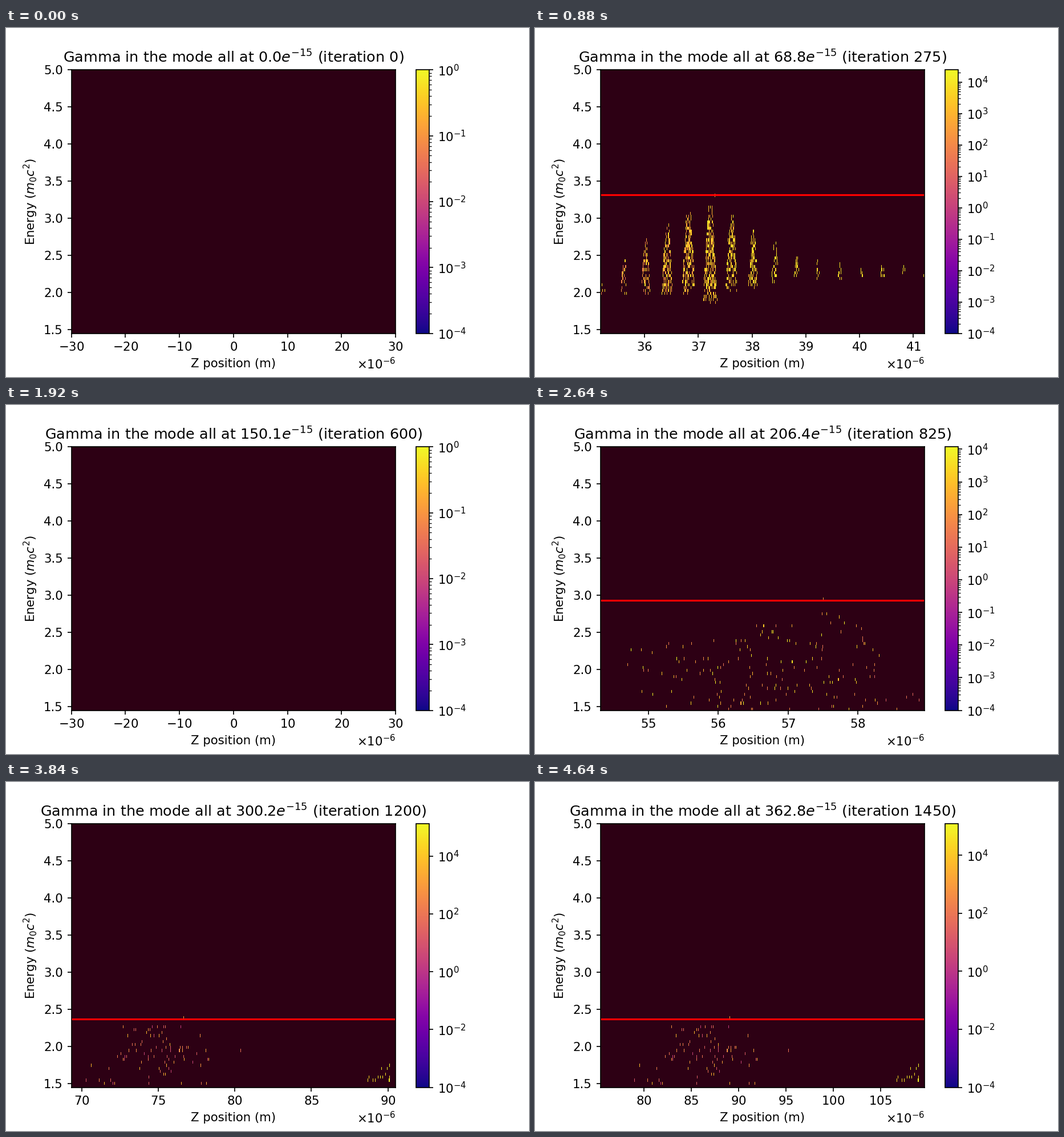
Recreate the animation shown at these times as a matplotlib script. Size 917 by 611 pixels, loop 4720 ms.

```python
import numpy as np
import matplotlib.pyplot as plt
from matplotlib.animation import FuncAnimation
from matplotlib.colors import LogNorm

plt.rcParams.update({"font.family": "DejaVu Sans", "font.size": 10})

FRAMES, INTERVAL = 59, 80
ITER_STEP, FS_PER_ITER = 25, 0.2502
COLS, ROWS = 568, 89
E_MIN, E_MAX, E_BIN = 1.45, 5.0, 0.04
E_TOP = E_MIN + ROWS * E_BIN
AXIS_PX = 568.5
UM = 1e-6
FIRST_DATA, BLANK = 3, 24
N_BUNCH, N_WIDE, N_TIGHT, N_LOW, N_FAST = 20, 170, 85, 9, 14

# Slow trends over the run, linear between these moments
KEYS = [3, 7, 15, 33, 48, 58]
LEFT = [31.0, 32.267, 38.088, 54.313, 69.333, 75.395]
RIGHT = [33.4, 36.307, 46.119, 58.955, 90.5, 109.67]
LOG_MAX = [3.9, 4.176, 4.594, 4.073, 5.113, 5.083]
E_LINE = [2.6, 3.31, 3.331, 2.93, 2.373, 2.373]
U_PEAK = [0.5, 0.506, 0.2, 0.685, 0.346, 0.398]


def at(k, values):
    return np.interp(k, KEYS, values)


def lerp(a, b, w):
    return a + (b - a) * w


def ramp(x, start, end):
    return np.clip((x - start) / (end - start), 0, 1)


def bell(x, center, width):
    return np.exp(-((x - center) / width) ** 2)


def early_bunches(i):
    """Count, lowest and highest energy, half width in px."""
    g = bell(i, 4.4, 2.4)
    root = np.sqrt(g)
    return np.array([330 * g, 2.0 + 0 * i, 2.04 + 1.24 * root, 4 + 13 * root])


def late_bunches(i):
    odd = i % 2
    core = bell(i, 5, 1.9)
    tail = 30 * (1 - i / 30) * ramp(i, 0, 3)
    count = (220 * core + tail) * (0.75 + 0.5 * odd)
    low = lerp(1.95, 2.4, ramp(i, 5, 9)) - 0.2 * odd * core
    high = 2.75 + 0.42 * bell(i, 5.5, 2.6) - 0.75 * np.exp(-i)
    return np.array([count, low, high, 3.8 + 4.7 * bell(i, 5, 2.6)])


# Loose electrons: a wide cloud that gathers into a slower cluster
rng = np.random.default_rng(12)
wide_u = rng.beta(2.1, 1.9, N_WIDE)
wide_top = 2.35 + 0.5 * bell(wide_u, 0.65, 0.2) - 0.7 * (wide_u > 0.86)
wide_e = rng.uniform(1.46, wide_top)
wide_loss = rng.uniform(0, 2.8, N_WIDE) + 0.8 * (wide_u > 0.82)
tight_u = np.clip(rng.normal(0.267, 0.075, N_WIDE), 0.02, 0.52)
tight_e = np.clip(rng.normal(1.92, 0.2, N_WIDE), 1.5, 2.28)
tight_u[:N_LOW] = rng.uniform(0.0, 0.45, N_LOW)
tight_e[:N_LOW] = rng.uniform(1.46, 1.56, N_LOW)
tight_loss = rng.uniform(1.2, 4.8, N_WIDE)
fast_u = 0.98 - 0.075 * rng.random(N_FAST) ** 3
fast_e = rng.uniform(1.5, 1.78, N_FAST)
fast_loss = rng.uniform(0, 0.9, N_FAST)


def put(grid, u, energy, log_value):
    col = np.floor(np.asarray(u) * COLS).astype(int)
    row = np.floor((np.asarray(energy) - E_MIN) / E_BIN).astype(int)
    ok = (col >= 0) & (col < COLS) & (row >= 0) & (row < ROWS)
    values = np.broadcast_to(10.0 ** np.asarray(log_value), ok.shape)
    grid[row[ok], col[ok]] = values[ok]


def add_bunches(grid, k, width, log_max):
    noise = np.random.default_rng(100 + k)
    late = ramp(k, 7, 15)
    amount = lerp(0.25, 1, ramp(k, 3, 7)) * (1 - ramp(k, 15, 33)) ** 1.5
    index = np.arange(N_BUNCH)
    bunches = lerp(early_bunches(index), late_bunches(index), late)
    for i, (count, low, high, half) in enumerate(bunches.T):
        n = int(round(count * amount))
        f = noise.beta(lerp(1.1, 1.9, late), lerp(2.0, 2.2, late), n)
        taper = 1 - lerp(0.85, 0.6, late) * f
        u = (lerp(0.067, 0.015, late) + 0.4 * i) / width
        u = u + noise.uniform(-1, 1, n) * taper * half / AXIS_PX
        high = min(high, at(k, E_LINE) - 0.03)
        dim = lerp(2.2, 0.6, ramp(i, 0, 8))
        put(grid, u, lerp(low, high, f),
            log_max - dim * noise.uniform(0.1, 1.5, n))


def add_loose(grid, k, log_max):
    gather = ramp(k, 33, 48)
    n = int(lerp(N_WIDE, N_TIGHT, gather) * ramp(k, 15, 33))
    u = lerp(wide_u, tight_u, gather) + 0.059 * ramp(k, 48, 58)
    put(grid, u[:n], lerp(wide_e, tight_e, gather)[:n],
        log_max - lerp(wide_loss, tight_loss, gather)[:n])
    n = int(N_FAST * ramp(k, 36, 46))
    put(grid, fast_u[:n], fast_e[:n], log_max - fast_loss[:n])


def histogram(k, width, log_max):
    grid = np.zeros((ROWS, COLS))
    add_bunches(grid, k, width, log_max)
    add_loose(grid, k, log_max)
    put(grid, [at(k, U_PEAK)], [at(k, E_LINE)], log_max - 2)
    return np.ma.masked_equal(grid, 0)


def set_bar_ticks(log_max):
    """Every decade with minor ticks, or every other one on long scales."""
    long = log_max > 5
    decades = 10.0 ** np.arange(-4, int(log_max) + 1)
    minor = np.outer(decades, np.arange(2, 10)).ravel()
    bar.set_ticks(decades[::2] if long else decades)
    bar.set_ticks([] if long else minor[minor < 10 ** log_max], minor=True)


fig, ax = plt.subplots(figsize=(6.00328, 4), dpi=152.75)
fig.subplots_adjust(left=0.125, right=0.9, bottom=0.125, top=0.88)
ax.set_facecolor("#2d0014")
image = ax.imshow(np.ma.masked_all((ROWS, COLS)), origin="lower",
                  aspect="auto", interpolation="nearest", cmap="plasma",
                  norm=LogNorm(1e-4, 1),
                  extent=(-30 * UM, 30 * UM, E_MIN, E_TOP))
bar = fig.colorbar(image, ax=ax)
line = ax.axhline(3, color="red", lw=1.5)
ax.set_ylim(E_MIN, E_MAX)
ax.set_xlabel("Z position (m)")
ax.set_ylabel("Energy ($m_0c^2$)")
ax.ticklabel_format(axis="x", style="sci", scilimits=(-6, -6),
                    useOffset=False, useMathText=True)


def update(k):
    empty = k < FIRST_DATA or k == BLANK
    if empty:
        left, right, log_max = -30, 30, 0
        data = np.ma.masked_all((ROWS, COLS))
    else:
        left, right, log_max = (at(k, v) for v in (LEFT, RIGHT, LOG_MAX))
        data = histogram(k, right - left, log_max)
        line.set_ydata([at(k, E_LINE)] * 2)
    line.set_visible(not empty)
    image.set_data(data)
    image.set_extent((left * UM, right * UM, E_MIN, E_TOP))
    image.norm.vmax = 10.0 ** log_max
    set_bar_ticks(log_max)
    ax.set_xlim(left * UM, right * UM)
    ax.set_ylim(E_MIN, E_MAX)
    step = k * ITER_STEP
    ax.set_title(f"Gamma in the mode all at ${step * FS_PER_ITER:.1f}e^{{-15}}$"
                 f" (iteration {step})")
    return image, line


anim = FuncAnimation(fig, update, frames=FRAMES, interval=INTERVAL,
                     init_func=lambda: update(0), repeat=True, repeat_delay=0)
plt.show()
```
